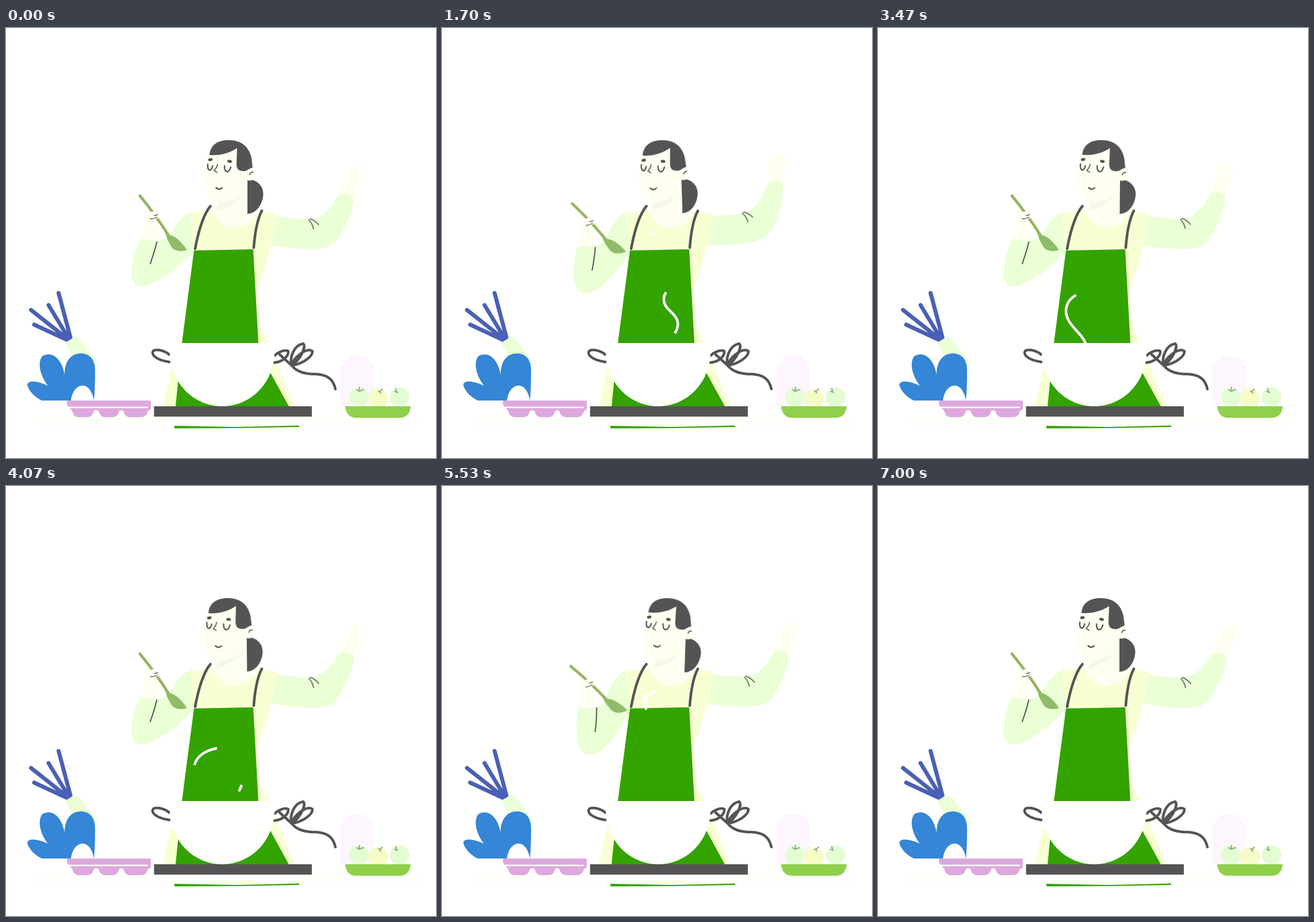
Recreate the animation shown at these times as an HTML page without scripts. Size 748 by 748 pixels, loop 7.03 s.

```html
<!DOCTYPE html>
<html lang="en">
<head>
<meta charset="utf-8">
<title>Cook</title>
<style>
html, body { margin: 0; width: 100%; height: 100%; overflow: hidden; background: #fff; }
svg { display: block; width: 100%; height: 100%; }

.ink { fill: none; stroke: #545454; stroke-linecap: round; stroke-linejoin: round; }
.dark { fill: #545454; }
.skin { fill: #fdfff0; }
.sleeve { fill: #eaffd5; }
.shirt { fill: #f8ffd2; }
.apron { fill: #33a300; }

.head, .spoon, .hand-l, .crease-l, .arm-r, .hand-r, .crease-r, .sleeve-l, .sleeve-r {
  animation: 7030ms ease-in-out infinite;
}

.head { transform-origin: 388px 378px; animation-name: head; }
@keyframes head {
  0%, 3.84% { transform: rotate(0deg); }
  15.6% { transform: rotate(-5.6deg); }
  33.2% { transform: rotate(2.4deg); animation-timing-function: linear; }
  49.4% { transform: rotate(.5deg); animation-timing-function: ease-out; }
  66.4% { transform: rotate(-1.2deg); }
  79% { transform: rotate(1.9deg); }
  87%, 100% { transform: rotate(0deg); }
}

/* tasting arm */
.sleeve-l { animation-name: sleeve-l; }
@keyframes sleeve-l {
  0%, 3%, 33.2%, 66.4%, 99.57%, 100% { d: path("M326 319C305 324 295 342 280 366L263 371L233 367C222 395 216 415 219 436C222 450 232 452 245 448C275 438 300 415 327 389Z"); }
  16.4%, 83% { d: path("M326 319C305 324 294 345 286 374L270 389L238 387C236 410 235 430 240 450C246 470 258 474 270 469C295 458 310 425 327 392Z"); }
}
.crease-l { animation-name: crease-l; }
@keyframes crease-l {
  0%, 3%, 33.2%, 66.4%, 99.57%, 100% { d: path("M262.500 372Q258 390 251 410"); }
  16.4%, 83% { d: path("M270 388Q271 408 269 430"); }
}
.spoon { transform-origin: 284px 362px; animation-name: spoon; }
@keyframes spoon {
  0%, 3%, 33.2%, 66.4%, 99.57%, 100% { transform: none; }
  16.4%, 83% { transform: translate(4px, 12px) rotate(-13deg); }
}
.hand-l { transform-origin: 254px 345px; animation-name: hand-l; }
@keyframes hand-l {
  0%, 3%, 33.2%, 66.4%, 99.57%, 100% { transform: none; }
  16.4%, 83% { transform: translate(1px, 20px) rotate(-9deg); }
}

/* waving arm */
.arm-r { transform-origin: 470px 350px; animation-name: nudge; }
@keyframes nudge {
  0%, 3.84% { transform: rotate(-1.2deg); }
  25%, 100% { transform: none; }
}
.sleeve-r { animation-name: sleeve-r; }
@keyframes sleeve-r {
  0%, 3.84% { d: path("M468 327C495 332 517 334 531 334C556 330 567 312 579 294C588 285 606 292 606 304C601 326 592 346 580 364C570 382 556 387 530 386C500 385 480 382 458 377Z"); }
  32% { d: path("M468 327C492 325 510 323 525 319C548 312 555 290 564 267C572 257 592 262 591 275C590 300 585 325 576 343C567 360 552 368 530 371C500 376 480 379 458 377Z"); animation-timing-function: cubic-bezier(.2,.4,.3,1); }
  65.4% { d: path("M468 327C495 332 517 334 531 334C556 330 567 312 579 294C588 285 606 292 606 304C601 326 592 346 580 364C570 382 556 387 530 386C500 385 480 382 458 377Z"); animation-timing-function: cubic-bezier(.7,0,.8,.6); }
  91.8% { d: path("M468 327C492 325 510 323 525 319C548 312 555 290 564 267C572 257 592 262 591 275C590 300 585 325 576 343C567 360 552 368 530 371C500 376 480 379 458 377Z"); animation-timing-function: cubic-bezier(.4,0,.8,.9); }
  99.57%, 100% { d: path("M468 327C495 332 517 334 531 334C556 330 567 312 579 294C588 285 606 292 606 304C601 326 592 346 580 364C570 382 556 387 530 386C500 385 480 382 458 377Z"); }
}
.hand-r { transform-origin: 594px 292px; animation-name: wave; --up: translate(-16px, -27px) rotate(-20deg); }
.crease-r { transform-origin: 533px 338px; animation-name: wave; --up: translate(-5px, -16px) rotate(-8deg); }
@keyframes wave {
  0%, 3.84% { transform: translate(0, 0) rotate(0deg); }
  32% { transform: var(--up); animation-timing-function: cubic-bezier(.2,.4,.3,1); }
  65.4% { transform: translate(0, 0) rotate(0deg); animation-timing-function: cubic-bezier(.7,0,.8,.6); }
  91.8% { transform: var(--up); animation-timing-function: cubic-bezier(.4,0,.8,.9); }
  99.57%, 100% { transform: translate(0, 0) rotate(0deg); }
}

/* steam: each wisp grows from its foot, then leaves through its tip */
.steam path { fill: none; stroke: #fff; stroke-width: 4.5; stroke-dasharray: 0 0 0 300; animation: var(--wisp) 7030ms linear infinite; }
@keyframes s1 {
  0%, 4.3%, 42.7% { stroke-dasharray: 0 0 0 300; }
  14.9%, 50.9% { stroke-dasharray: 0 0 100 300; }
  22.8%, 62.6%, 100% { stroke-dasharray: 0 100 0 300; }
}
@keyframes s2 {
  0%, 11.1%, 64.4% { stroke-dasharray: 0 0 0 300; }
  16.9%, 72.5% { stroke-dasharray: 0 0 100 300; }
  24.9%, 84.8%, 100% { stroke-dasharray: 0 100 0 300; }
}
@keyframes s3 {
  0%, 18.5%, 56.9% { stroke-dasharray: 0 0 0 300; }
  26.3%, 66.3% { stroke-dasharray: 0 0 100 300; }
  33.2%, 76.8%, 100% { stroke-dasharray: 0 100 0 300; }
}
@keyframes s4 {
  0%, 25.6%, 79.1% { stroke-dasharray: 0 0 0 300; }
  33.4%, 86.1% { stroke-dasharray: 0 0 100 300; }
  42.7%, 91.7%, 100% { stroke-dasharray: 0 100 0 300; }
}
@keyframes s5 {
  0%, 30.6% { stroke-dasharray: 0 0 0 300; }
  33.7% { stroke-dasharray: 0 0 100 300; }
  38.4%, 100% { stroke-dasharray: 0 100 0 300; }
}
</style>
</head>
<body>
<svg viewBox="0 0 748 748">
  <path fill="#fefefb" d="M52 676H720V692H52Z"/>

  <g class="arm-r">
    <path class="skin hand-r" d="M579 294C586 280 589 266 594 254C599 247 604 243 607 240L609 243L604 252L620 240L622 242L613 253L625 246L627 248L617 260L623 258C618 268 614 284 605 302Z"/>
    <path class="sleeve sleeve-r" d="M468 327C495 332 517 334 531 334C556 330 567 312 579 294C588 285 606 292 606 304C601 326 592 346 580 364C570 382 556 387 530 386C500 385 480 382 458 377Z"/>
    <path class="ink crease-r" stroke-width="1.600" d="M529 333Q538 336 544 344M527 335Q533 341 535 351"/>
  </g>

  <path class="sleeve sleeve-l" d="M326 319C305 324 295 342 280 366L263 371L233 367C222 395 216 415 219 436C222 450 232 452 245 448C275 438 300 415 327 389Z"/>
  <path class="ink crease-l" stroke-width="2" d="M262.500 372Q258 390 251 410"/>

  <path class="shirt" d="M320 321L358 318H440L472 323C466 365 456 405 438 452L439 508L456 548L502 658H273L289 585L305 548L326 388Z"/>
  <path class="skin" d="M358 316C366 336 379 348 398 348C416 347 430 337 441 319L420 300H368Z"/>

  <g class="head">
    <path class="dark" d="M419 263C436 263 447.500 274 447.500 289C447 306 435 324 419 323Z"/>
    <path class="skin" d="M355 215C348 235 345 250 346 265C347 291 354 304 371 304L365 318C380 336 408 336 420 322V265C430 267 434 261 433 252C432 245 429 243 424 244L408 205Z"/>
    <path fill="#f6f7ec" d="M371 304C389 303 403 297 412 288C402 306 383 312 366 318Z"/>
    <path class="dark" d="M354 221C355 204 368 195 387 195C410 195 423 207 427 226L429 243C424 243 420 249 414 249C404 249 401 245 401 236L402 209C388 218 373 222 354 221Z"/>
    <ellipse class="dark" cx="355.500" cy="229" rx="4" ry="2.500" transform="rotate(-12 355.500 229)"/>
    <ellipse class="dark" cx="389" cy="232" rx="4.200" ry="2.500" transform="rotate(12 389 232)"/>
    <path class="ink" stroke-width="2.400" d="M351 237C350 249 357 251 359.500 240M380 240C380 253 388 253 391 242M365.500 278Q371 283 376 278"/>
    <path class="ink" stroke-width="1.700" d="M368 237Q367 243 362 248L367 251M424 255Q425 250 430 251"/>
  </g>

  <path class="apron" d="M327 387L430 385L439 548L459 598L492 658H295L306 548Z"/>
  <path class="ink" stroke-width="4.500" d="M355.500 310C343 325 335 352 329 384M445 318C437 333 433 356 431 382"/>

  <g class="steam">
    <path style="--wisp: s1" pathLength="100" d="M362 552C357 530 326 517 327 491C328 471 347 460 367 456"/>
    <path style="--wisp: s2" pathLength="100" d="M358 425C366 420 369 413 367 404C364 392 350 389 351 376C352 365 362 360 371 358"/>
    <path style="--wisp: s3" pathLength="100" d="M405 531C412 520 412 510 405 501C396 490 385 485 386 470C387 456 402 449 415 445"/>
    <path style="--wisp: s4" pathLength="100" d="M407 412C409 403 406 397 400 391C392 383 388 380 389 372C391 362 400 357 412 355"/>
    <path style="--wisp: s5" pathLength="100" d="M403 479Q412 467 428 462"/>
  </g>

  <g class="hand-l">
    <path class="skin" d="M235 367C241 353 239 338 245 323C251 316 262 316 265 323C266 338 262 354 264 371Z"/>
  </g>
  <g class="spoon">
    <path d="M233 292Q262 327 284 363" fill="none" stroke="#96b45d" stroke-width="5" stroke-linecap="round"/>
    <path fill="#8fbc68" d="M277 356C281 360 288 360 294 364C303 370 309 378 315 386C304 390 293 388 288 381C283 373 279 365 277 356Z"/>
  </g>
  <g class="hand-l">
    <path class="skin" d="M249 322C254 318 260 318 264 321L265 331L252 333Z"/>
    <path class="ink" stroke-width="1.300" d="M258 326L264 325M251 332Q257 332 263 329"/>
  </g>

  <g class="ink" stroke-width="4.500">
    <path d="M284 568C277 562 264 558 257 561C251 566 258 577 284 581"/>
    <path d="M467 570C473 564 484 559 491 562C492 571 481 581 467 582"/>
    <path d="M476 568L497 587C493 574 500 552 517 549C523 554 512 577 497 587C500 573 523 555 533 562C534 573 513 585 497 587C506 599 521 602 539 602C558 603 569 610 573 628"/>
  </g>
  <path fill="#fff" d="M285 548H467V562C467 617 426 658 376 658S285 617 285 562Z"/>
  <path class="dark" d="M257.500 658H532V676H257.500Z"/>
  <path class="apron" d="M293 692L400 694L510 691.500V694L402 696L293 696.500Z"/>

  <path fill="#eaffd5" d="M103 548C106 537 122 534 129 542L159 582L153 600L130 595Z"/>
  <path fill="none" stroke="#4a60b6" stroke-width="7" stroke-linecap="round" d="M91.500 461L112 538M74 482L109 540M43.500 490.500L106 540M49 516L105 542"/>
  <path fill="#3586d6" d="M62 648C50 642 40 632 37 621C38 612 54 614 73 622C60 606 54 583 63 571C79 561 97 574 102 603C102 578 114 566 131 566C147 567 155 577 155 598Q155 626 153 648Z"/>
  <path fill="#fff" d="M113 648C115 630 125 622 133 622C143 622 150 632 153 648Z"/>
  <path fill="#dda8dd" d="M108 648H250Q252 648 252 651V661Q252 665 247 666C245 674 241 677 234 677H216C209 677 206 673 204 666Q200 664 197 666C195 674 191 677 184 677H173C166 677 163 673 161 666Q157 664 153 666C151 674 147 677 141 677H127C120 677 117 673 115 666L106 655V650Q106 648 108 648Z"/>
  <path d="M111 660H246" stroke="#fff" stroke-width="2.500" stroke-linecap="round"/>

  <path fill="#fdf6ff" d="M582 590L595 572H628L640 590V658H582Z"/>
  <g fill="#e4fcd2">
    <circle cx="613.500" cy="642" r="17"/>
    <circle cx="684.500" cy="642" r="17"/>
    <circle cx="647" cy="645" r="17" fill="#f5fcc4"/>
  </g>
  <path fill="none" stroke="#98a695" stroke-width="2" stroke-linecap="round" d="M614 632L615 625M610 629L614 632L622 629M650 633L655 628M648 631L652 635M680 634L678 627M676 632L681 634"/>
  <path fill="#90d04c" d="M590 658H704C703 670 697 678 685 678H609C597 678 591 670 590 658Z"/>
</svg>
</body>
</html>
```
